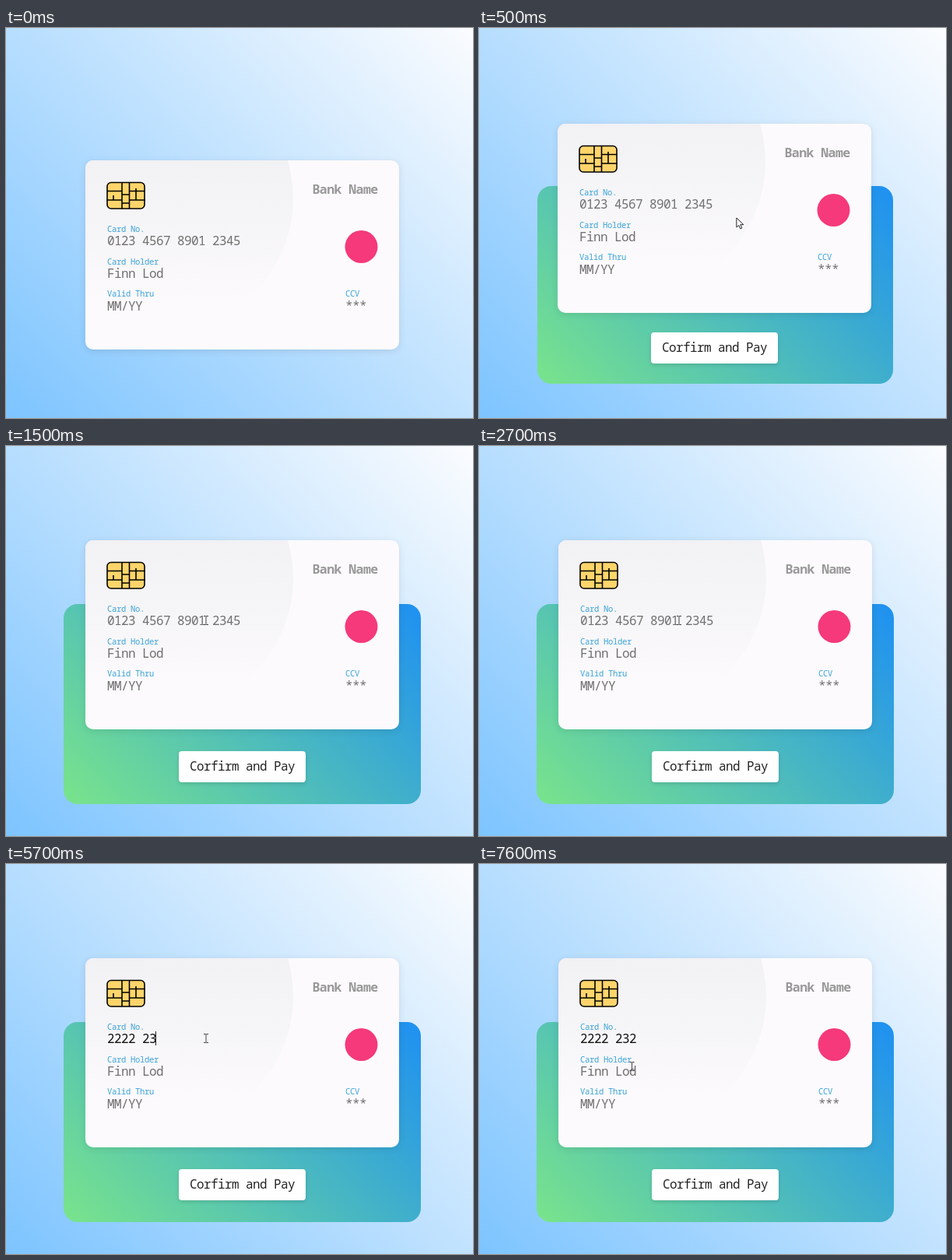
An HTML page that plays this animation: 600x501 px, repeating every 8 s.

```html
<!DOCTYPE html>
<html lang="en">
<head>
<meta charset="utf-8">
<title>Card payment</title>
<style>
  html, body { margin: 0; width: 100%; height: 100%; overflow: hidden; }
  body { background: linear-gradient(45deg, #7dc4ff, #fbfcfe); }
  body > * { position: absolute; }
  body, svg text { font: 16px "Noto Sans Mono", monospace; letter-spacing: -.6px; }
  #panel { border-radius: 18px; background: linear-gradient(45deg, #79e48b, #1e90f2); }
  #pay {
    width: 163px; height: 40px; line-height: 39px; text-align: center;
    border-radius: 4px; background: #fff; color: #222; box-shadow: 0 2px 5px #0002;
  }
  #card {
    width: 403px; height: 243px; border-radius: 10px; overflow: hidden;
    background: #fcfafc; box-shadow: 0 2px 10px #0000001a;
  }
  #card svg { display: block; }
  text { fill: #707070; white-space: pre; }
  #card .label { font-size: 10.5px; font-weight: 500; letter-spacing: -.3px; fill: #3aa3d8; }
  #card .bank { font-size: 16.5px; font-weight: 600; letter-spacing: -.55px; fill: #999; }
  #card .typed { fill: #111; }
  #mouse { left: 0; top: 0; }
</style>
</head>
<body>
<div id="panel"></div>
<div id="pay">Corfirm and Pay</div>
<div id="card">
  <svg width="403" height="243">
    <defs>
      <linearGradient id="fade" x2="0" y2="1">
        <stop offset=".36" stop-color="#f2f1f4"/>
        <stop offset=".64" stop-color="#f6f5f7"/>
        <stop offset=".9" stop-color="#fcfafc"/>
      </linearGradient>
    </defs>
    <circle cx="97" cy="49" r="170" fill="url(#fade)"/>
    <g fill="none" stroke="#000" stroke-width="1.6">
      <rect x="28" y="28.500" width="48" height="33.500" rx="5" fill="#ffd56b"/>
      <path d="M47 28v34M56.500 28v34M28 39.500h19M28 51h19M56.500 39.500h20M56.500 51h20
               M47 44h9.500M47 55h9.500M36 45v6M65 36v15"/>
    </g>
    <text class="bank" x="291.500" y="43">Bank Name</text>
    <circle cx="354.500" cy="111" r="21" fill="#f5397b"/>
    <text class="label" x="28" y="91.500">Card No.</text>
    <text id="number" x="28" y="109"></text>
    <text class="label" x="28" y="133.500">Card Holder</text>
    <text x="28" y="151">Finn Lod</text>
    <text class="label" x="28" y="175">Valid Thru</text>
    <text x="28" y="192.500">MM/YY</text>
    <text class="label" x="334" y="175">CCV</text>
    <text x="334" y="192.500">***</text>
    <rect id="caret" width="1" height="18" fill="#222"/>
  </svg>
</div>
<svg id="mouse" width="600" height="501">
  <path id="arrow" d="M0 0v12l3-2.500 2 4.500 2-1-2-4.300h4z" fill="#fff" stroke="#222"/>
  <path id="beam" d="M-3-5.500h2.500l.5.500.5-.500h2.500M0-5v10M-3 5.500h2.500l.5-.500.5.500h2.500" fill="none" stroke="#444"/>
</svg>
<script>
const LOOP = 8000;
const ADVANCE = 9;
const TYPED = "2222 232";
const KEYS = [3000, 3200, 4300, 4500, 4800, 5300, 5700, 5900];
const NAME_CLICK = 7100;
// time, x, y
const PATH = [[100, 470, 300], [500, 331, 244], [1100, 257, 224], [5900, 257, 224], [6500, 196.5, 260]];

const el = id => document.getElementById(id);
const mix = (a, b, k) => a + (b - a) * k;
const clamp = x => Math.min(1, Math.max(0, x));
const show = (id, on) => el(id).setAttribute("visibility", on ? "visible" : "hidden");

function place(id, x, y, w, h) {
  const s = el(id).style;
  s.left = x + "px";
  s.top = y + "px";
  if (w) { s.width = w + "px"; s.height = h + "px"; }
}

function openPanel(t) {
  const p = 1 - (1 - clamp((t - 80) / 660)) ** 3;
  const dx = p > 0 && p < 1 ? -1 : 0;
  const left = mix(102, 74, p), top = mix(195, 203, p);
  place("panel", left, top, mix(505, 533, p) - left, mix(405, 460, p) - top);
  place("pay", 222 + dx, mix(362, 392, p));
  place("card", 102 + dx, mix(170, 121, p));
}

function typeNumber(t) {
  const n = KEYS.filter(k => k <= t).length;
  const number = el("number");
  number.textContent = n ? TYPED.slice(0, n) : "0123 4567 8901 2345";
  number.setAttribute("class", n ? "typed" : "");
  const inName = t >= NAME_CLICK;
  const since = t - (inName ? NAME_CLICK : KEYS[n - 1]);
  const caret = el("caret");
  caret.setAttribute("x", 27 + (inName ? 0 : n * ADVANCE));
  caret.setAttribute("y", inName ? 136 : 94);
  show("caret", n && since % 1000 < 500);
}

function moveMouse(t) {
  let [, x, y] = PATH[0];
  for (let i = 1; i < PATH.length; i++) {
    const [t0, x0, y0] = PATH[i - 1], [t1, x1, y1] = PATH[i];
    if (t < t0) break;
    const k = clamp((t - t0) / (t1 - t0));
    x = mix(x0, x1, k);
    y = mix(y0, y1, k);
  }
  const overField = Math.abs(y - 224) < 10 || (t > 5900 && y > 254);
  for (const id of ["arrow", "beam"]) {
    el(id).setAttribute("transform", `translate(${x} ${y})`);
    show(id, t >= 100 && overField === (id === "beam"));
  }
}

const start = performance.now();
function draw(now) {
  const t = Math.max(0, now - start) % LOOP;
  openPanel(t);
  typeNumber(t);
  moveMouse(t);
  requestAnimationFrame(draw);
}
draw(start);
</script>
</body>
</html>
```
